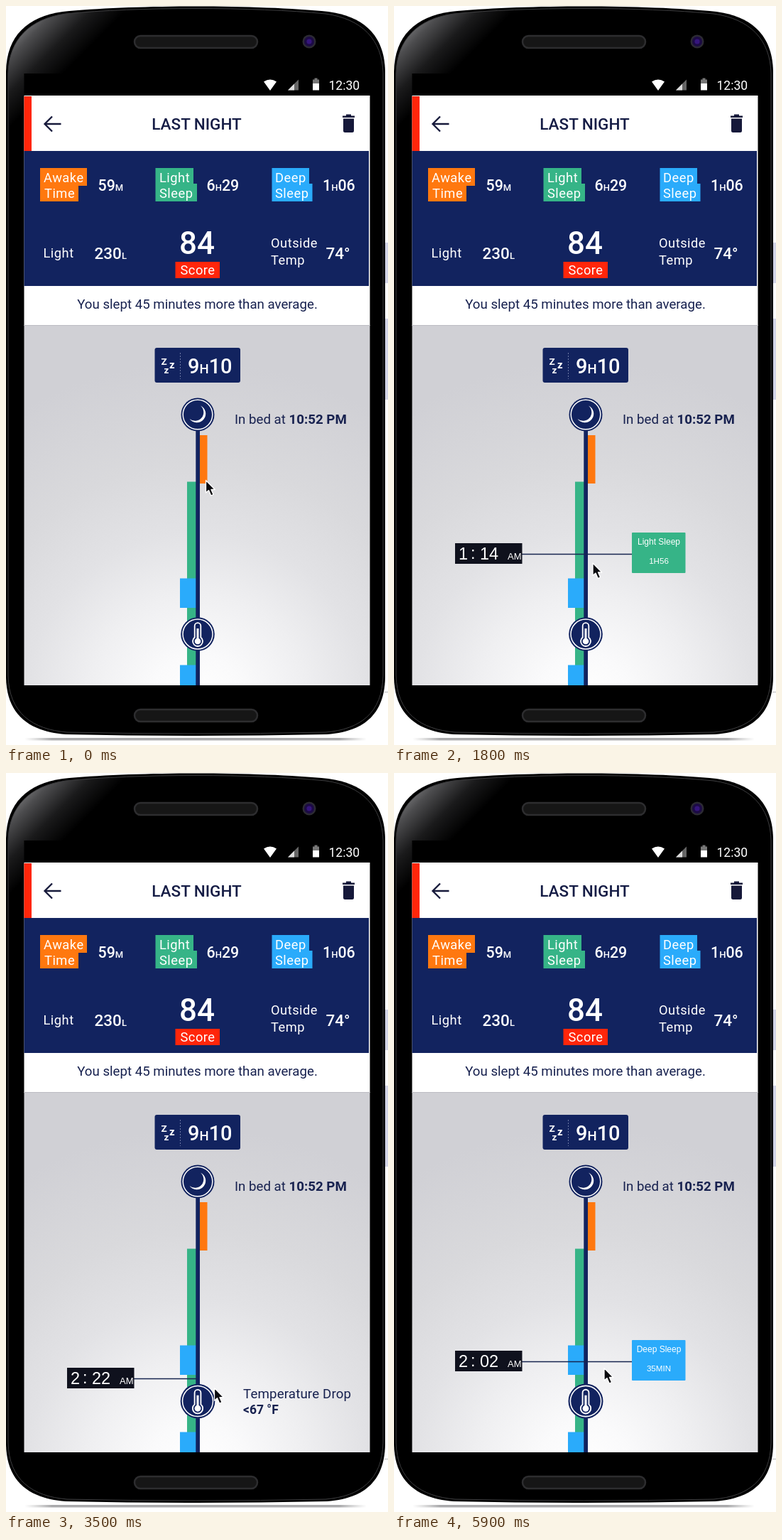
Recreate the animation shown at these times as an HTML page. Size 538 by 1040 pixels, loop 6 s.

```html
<!DOCTYPE html>
<html lang="en">
<head>
<meta charset="utf-8">
<title>Sleep timeline</title>
<style>
html, body { margin: 0; width: 100%; height: 100%; overflow: hidden; background: #fff; }
svg { display: block; width: 100%; height: 100%; }
text { font-family: Roboto, "Open Sans", sans-serif; white-space: pre; }
.w { fill: #fff; }
.n { fill: #12235f; }
.green { fill: #36b487; }
.blue { fill: #2aabfb; }
.orange { fill: #ff780f; }
.label text { font-size: 18.3px; letter-spacing: .5px; fill: #fff; }
.value text { font-size: 21.4px; font-weight: 500; fill: #fff; }
.value tspan { font-size: 13px; }
.body { font-size: 18.7px; fill: #17214f; }
.bold { font-weight: 600; }
.sans text { font-family: "Liberation Sans", Arial, sans-serif; fill: #fff; }
</style>
</head>
<body>
<svg viewBox="0 0 538 1040" xmlns="http://www.w3.org/2000/svg">
  <defs>
    <radialGradient id="glow" gradientUnits="userSpaceOnUse" cx="268" cy="980" r="480">
      <stop offset="0" stop-color="#fff"/>
      <stop offset=".14" stop-color="#fafafb"/>
      <stop offset=".32" stop-color="#efeff1"/>
      <stop offset=".5" stop-color="#e2e2e5"/>
      <stop offset=".7" stop-color="#d9d9dc"/>
      <stop offset="1" stop-color="#d0d0d5"/>
    </radialGradient>
    <linearGradient id="shine" gradientUnits="userSpaceOnUse" x1="14" y1="22" x2="84" y2="92">
      <stop offset="0" stop-color="#8c8c8e"/>
      <stop offset=".3" stop-color="#4c4c4e"/>
      <stop offset=".65" stop-color="#1a1a1b"/>
      <stop offset="1" stop-color="#000"/>
    </linearGradient>
    <linearGradient id="foot" x1="0" x2="1">
      <stop offset="0" stop-color="#bbb" stop-opacity="0"/>
      <stop offset=".08" stop-color="#a9a9ab"/>
      <stop offset=".92" stop-color="#a9a9ab"/>
      <stop offset="1" stop-color="#bbb" stop-opacity="0"/>
    </linearGradient>
    <clipPath id="screen"><rect x="25.500" y="95" width="487" height="861"/></clipPath>
  </defs>

  <!-- Phone -->
  <g fill="#d2d4e6">
    <rect x="532" y="333" width="6" height="57"/>
    <rect x="532" y="440" width="6" height="114"/>
  </g>
  <path d="M533 965.500H538" stroke="#bbb"/>
  <rect x="26" y="1030" width="482" height="3.500" rx="1.700" fill="url(#foot)"/>
  <path d="M0 92C1 42 30 15 80 8C180-2 354-2 454 8C505 15 533 42 534 92V945C533 998 503 1021 452 1025Q267 1029 84 1025C33 1021 1 998 0 945Z"/>
  <path d="M3 95C4 47 33 18 84 11C184 1 350 1 450 11C501 18 530 47 531 95V942C530 995 499 1018 450 1022Q267 1026 86 1022C37 1018 4 995 3 942Z" fill="url(#shine)" stroke="#3c3c3e"/>
  <g fill="#161616" stroke="#2d2d2f" stroke-width="2.500">
    <rect x="181" y="42" width="173" height="17" rx="8.500"/>
    <rect x="181" y="990" width="173" height="17" rx="8.500"/>
  </g>
  <circle cx="427" cy="50" r="9.500" fill="#2c2b33"/>
  <circle cx="427" cy="50" r="7" fill="#1c0b45"/>
  <circle cx="427" cy="50" r="3.600" fill="#35157c"/>

  <!-- Status bar -->
  <rect x="25.500" y="95" width="487" height="32"/>
  <path class="w" d="M363 106.500Q372 100.500 381 106.500L372 119Z"/>
  <path d="M397 118.500H412V103.500Z" fill="#666"/>
  <path d="M397 118.500H406V109.500Z" fill="#ddd"/>
  <path d="M432 103.500H434.500V101.500H438.500V103.500H441V110H432Z" fill="#777"/>
  <rect class="w" x="432" y="109" width="9" height="9.500"/>
  <text class="w" x="454.500" y="117.500" font-size="17.500">12:30</text>

  <g clip-path="url(#screen)">
    <rect class="w" x="25" y="126" width="488" height="324"/>
    <rect x="25" y="127" width="11" height="77" fill="#ff260a"/>
    <path d="M77.500 166H55M65 155.500L54.500 166L65 176.500" fill="none" stroke="#16193a" stroke-width="2.300"/>
    <text x="268.500" y="174" font-size="22.500" font-weight="500" fill="#151c45" text-anchor="middle">LAST NIGHT</text>
    <path d="M474 154.500H479V152.500H486V154.500H491V157H474ZM475 158.500H490V175.500Q490 178 487.500 178H477.500Q475 178 475 175.500Z" fill="#16193a"/>

    <!-- Summary -->
    <rect class="n" x="25" y="204" width="486" height="190"/>
    <path class="orange" d="M48 228H114V253H102V275H48Z"/>
    <path class="green" d="M210.500 228H264V250H269V275H210.500Z"/>
    <path class="blue" d="M374.500 228H427V250H431.500V275H374.500Z"/>
    <rect x="238.500" y="360" width="62.500" height="23" fill="#ff260a"/>
    <g class="label">
      <text x="53" y="247.500">Awake</text><text x="54" y="270">Time</text>
      <text x="216" y="247.500">Light</text><text x="216" y="270">Sleep</text>
      <text x="379" y="247.500">Deep</text><text x="379" y="270">Sleep</text>
      <text x="52.500" y="353.500">Light</text>
      <text x="373" y="340">Outside</text><text x="373" y="363.500">Temp</text>
      <text x="270" y="377.500" text-anchor="middle">Score</text>
    </g>
    <g class="value">
      <text x="129.500" y="260">59<tspan>M</tspan></text>
      <text x="282.500" y="260">6<tspan>H</tspan>29</text>
      <text x="446" y="260">1<tspan>H</tspan>06</text>
      <text x="124.500" y="356" style="font-size:22.500px">230<tspan>L</tspan></text>
      <text x="450.500" y="356" style="font-size:22.500px">74°</text>
      <text x="269" y="349" text-anchor="middle" style="font-size:44px">84</text>
    </g>
    <text class="body" x="269.500" y="426" text-anchor="middle">You slept 45 minutes more than average.</text>

    <!-- Night -->
    <rect x="25" y="449" width="488" height="508" fill="url(#glow)"/>
    <path d="M25 449.500H513" stroke="#bcbcc2"/>
    <rect class="n" x="209.500" y="481" width="120.500" height="49" rx="3"/>
    <path d="M245.500 488V525" stroke="#6d79a5" stroke-dasharray="2 2"/>
    <g class="w" font-weight="700">
      <text x="218.500" y="505" font-size="13.500">Z</text>
      <text x="230" y="510" font-size="15">z</text>
      <text x="222.500" y="516.500" font-size="13.500">z</text>
    </g>
    <g class="value"><text x="256" y="517" style="font-size:29px">9<tspan style="font-size:18.500px">H</tspan>10</text></g>

    <rect class="orange" x="273" y="604" width="10.500" height="68"/>
    <rect class="green" x="255" y="669.500" width="13" height="287"/>
    <rect class="blue" x="245" y="805.500" width="23" height="41.500"/>
    <rect class="blue" x="245" y="927.500" width="23" height="29"/>
    <rect class="n" x="267.300" y="590" width="5.700" height="367"/>

    <g transform="translate(270 575)">
      <circle class="n" r="23.500"/>
      <circle r="20.800" fill="none" stroke="#fff" stroke-width="1.500"/>
      <path class="w" d="M4-12.500A12.500 12.500 0 1 1-11.500 6A11.500 11.500 0 0 0 4-12.500Z"/>
    </g>
    <text class="body" x="322" y="587.500">In bed at <tspan class="bold">10:52 PM</tspan></text>

    <!-- Scrubber -->
    <g id="scrub" class="sans">
      <path id="rule" stroke="#17254f" stroke-width="1.500"/>
      <rect x="86" y="-15" width="94.500" height="29" fill="#0f111d"/>
      <g font-size="23.500">
        <text id="hour" x="91" y="7.500"></text>
        <text x="108" y="6.500">:</text>
        <text id="minute" x="121" y="7.500"></text>
      </g>
      <text x="160" y="7.500" font-size="13">AM</text>
      <g id="tip" text-anchor="middle">
        <rect id="card" x="335" y="-30" width="75.500" height="57" rx="1"/>
        <text id="stage" x="373" y="-13" font-size="12"></text>
        <text id="span" x="373" y="14" font-size="11.600"></text>
      </g>
    </g>

    <g id="thermo">
      <circle class="n" r="23.800"/>
      <circle r="21" fill="none" stroke="#fff" stroke-width="1.500"/>
      <path d="M-4.300-11.500A4.300 4.300 0 0 1 4.300-11.500V4.500A7 7 0 1 1-4.300 4.500Z" fill="none" stroke="#fff" stroke-width="1.800"/>
      <path d="M0-8V9" stroke="#fff" stroke-width="3"/>
      <circle class="w" cy="10" r="4.300"/>
    </g>
    <g id="drop" class="body">
      <text x="334" y="879.500" letter-spacing=".15">Temperature Drop</text>
      <text class="bold" x="334" y="901.500" font-size="17.500">&lt;67 °F</text>
    </g>
  </g>

  <path id="cursor" d="M0-.5V17L4 13.600L7.200 21L10.600 19.500L7.500 12.500H12.800Z" fill="#0b0b0f" stroke="#fff" stroke-width="1.300" stroke-linejoin="round"/>
</svg>
<script>
const LOOP = 6000, STEP = 100;
const GREEN_FROM = 684, BLUE_FROM = 805.5, BLUE_TO = 847;

// time, pointer x, pointer y, scrubber y, thermometer scale
const KEYS = [
  [0, 281.5, 668, 654, 1],
  [1200, 270.5, 738, 724, 1],
  [2400, 289.5, 831, 819, 1],
  [3200, 293, 858, 842.7, 1],
  [4100, 294.5, 882.5, 871.2, 1.07],
  [4900, 296.5, 845, 834.7, 1.07],
  [5900, 296, 838, 828.2, 1.03]
];

const $ = id => document.getElementById(id);
const show = (id, on) => $(id).setAttribute("visibility", on ? "visible" : "hidden");
const move = (id, x, y, s = 1) => $(id).setAttribute("transform", `translate(${x} ${y}) scale(${s})`);

function pose(t) {
  let i = 0;
  while (i < KEYS.length - 2 && t >= KEYS[i + 1][0]) i++;
  const a = KEYS[i], b = KEYS[i + 1];
  const p = (t - a[0]) / (b[0] - a[0]);
  return a.slice(1).map((v, k) => v + (b[k + 1] - v) * p);
}

function draw(t) {
  const [px, py, y, scale] = pose(t);
  const active = y >= GREEN_FROM;
  const cold = y > BLUE_TO;
  const deep = y >= BLUE_FROM;
  // The timeline runs at .85 minutes per pixel.
  const mins = Math.max(0, Math.floor(34 + (y - 724) * .85 + 1e-6));

  move("cursor", px, py);
  move("scrub", 0, Math.floor(y));
  move("thermo", 270, 884, scale);
  $("rule").setAttribute("d", `M180 .5H${cold ? 270 : 335}`);
  $("hour").textContent = Math.floor(mins / 60);
  $("minute").textContent = String(mins % 60).padStart(2, "0");
  $("card").setAttribute("class", deep ? "blue" : "green");
  $("stage").textContent = deep ? "Deep Sleep" : "Light Sleep";
  $("span").textContent = deep ? "35MIN" : "1H56";
  show("scrub", active);
  show("tip", active && !cold);
  show("drop", cold);
}

const start = performance.now();
function tick() {
  const t = (performance.now() - start) % LOOP;
  draw(Math.floor(t / STEP) * STEP);
  requestAnimationFrame(tick);
}
tick();
</script>
</body>
</html>
```
